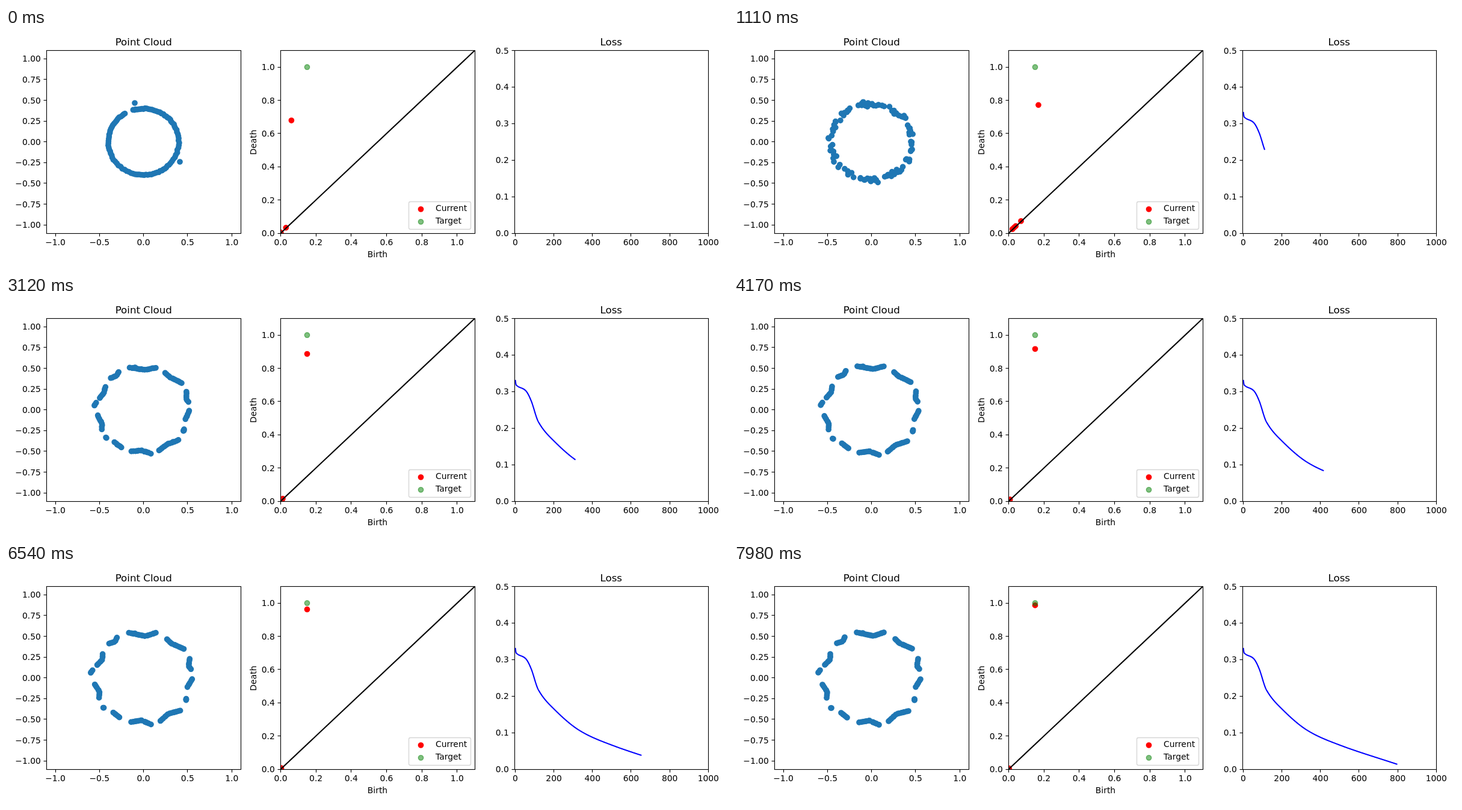
These frames come from a looping animation (1200x400 px, 8000 ms). An HTML page:

```html
<!DOCTYPE html>
<html lang="en">
<head>
<meta charset="utf-8">
<title>Point cloud optimisation</title>
<style>
  html, body { margin: 0; width: 100%; height: 100%; overflow: hidden; background: #fff; }
  svg { display: block; width: 100%; height: 100%; }
  text { font-family: "DejaVu Sans", sans-serif; font-size: 13.89px; fill: #000; }
  .title { font-size: 16.67px; }
  .axis { fill: none; stroke: #000; stroke-width: 1.11; }
</style>
</head>
<body>
<svg id="stage" viewBox="0 0 1200 400"></svg>
<script>
const LOOP = 8000, STEP = 30;
const TOP = 37.5, BOTTOM = 342, FRAME_BOTTOM = 342.5;
const stage = document.getElementById('stage');

function add(parent, tag, attrs, text) {
  const el = document.createElementNS('http://www.w3.org/2000/svg', tag);
  for (const key in attrs) el.setAttribute(key, attrs[key]);
  if (text !== undefined) el.textContent = text;
  parent.appendChild(el);
  return el;
}

const mix = (a, b, f) => a + (b - a) * f;
const range = (n, from, by) => Array.from({ length: n }, (_, i) => from + i * by);

// Seeded value between -1 and 1
const noise = n => {
  const v = Math.sin(n * 12.9898 + 4.1) * 43758.5453;
  return 2 * (v - Math.floor(v)) - 1;
};

// Scales
const cloudX = v => 228.6 + v * 146.6;
const cloudY = v => 189.75 - v * 138.4;
const diagX = v => 456.5 + v * 293.2;
const diagY = v => BOTTOM - v * 276.8;
const lossX = v => 846.4 + v * 0.3209;
const lossY = v => BOTTOM - v * 609;

function panel(id, left, right) {
  const clip = add(stage, 'clipPath', { id });
  add(clip, 'rect', { x: left, y: TOP, width: right - left, height: BOTTOM - TOP });
  return add(stage, 'g', { 'clip-path': `url(#${id})` });
}

function axes(left, right, xs, ys, x, y, xDigits, yDigits) {
  const label = (v, digits) => v.toFixed(digits).replace('-', '\u2212');
  const snap = v => Math.floor(v) + 0.5;
  add(stage, 'rect', { class: 'axis', x: left, y: TOP, width: right - left, height: FRAME_BOTTOM - TOP });
  for (const v of xs) {
    add(stage, 'path', { class: 'axis', d: `M${snap(x(v))} ${FRAME_BOTTOM}v5` });
    add(stage, 'text', { x: x(v), y: 362, 'text-anchor': 'middle' }, label(v, xDigits));
  }
  for (const v of ys) {
    add(stage, 'path', { class: 'axis', d: `M${left} ${snap(y(v))}h-5` });
    add(stage, 'text', { x: left - 9.7, y: Math.round(y(v) + 5), 'text-anchor': 'end' }, label(v, yDigits));
  }
}

function dot(parent, color, x, y, opacity = 1) {
  return add(parent, 'circle', {
    r: 4.17, cx: x, cy: y, fill: color, stroke: color, 'stroke-width': 1.39,
    'fill-opacity': opacity, 'stroke-opacity': opacity
  });
}

function move(el, x, y) {
  el.setAttribute('cx', x.toFixed(2));
  el.setAttribute('cy', y.toFixed(2));
}

// Panels
const cloud = panel('cloud', 67.5, 390.5);
const diagram = panel('diagram', 456.5, 779.5);
const chart = panel('chart', 845.5, 1167.5);

const noisy = range(4, 0, 1).map(() => dot(diagram, '#f00', 0, 0));
const current = dot(diagram, '#f00', 0, 0);
dot(diagram, '#008000', diagX(0.15), diagY(1), 0.5);
add(diagram, 'path', {
  d: `M${diagX(0)} ${diagY(0)}L${diagX(1.1)} ${diagY(1.1)}`, stroke: '#000', 'stroke-width': 2.08
});
const curve = add(chart, 'path', {
  fill: 'none', stroke: '#00f', 'stroke-width': 2.08, 'stroke-linejoin': 'round'
});

axes(67.5, 390.5, range(5, -1, 0.5), range(9, -1, 0.25), cloudX, cloudY, 1, 2);
axes(456.5, 779.5, range(6, 0, 0.2), range(6, 0, 0.2), diagX, diagY, 1, 1);
axes(845.5, 1167.5, range(6, 0, 200), range(6, 0, 0.1), lossX, lossY, 0, 1);
add(stage, 'text', { class: 'title', x: 228.8, y: 29, 'text-anchor': 'middle' }, 'Point Cloud');
add(stage, 'text', { class: 'title', x: 1005.8, y: 29, 'text-anchor': 'middle' }, 'Loss');
add(stage, 'text', { x: 617.5, y: 382, 'text-anchor': 'middle' }, 'Birth');
add(stage, 'text', { transform: 'translate(416 190.5) rotate(-90)', 'text-anchor': 'middle' }, 'Death');

// Legend
add(stage, 'rect', {
  x: 669.5, y: 289.5, width: 103, height: 46, rx: 2.8,
  fill: '#fff', 'fill-opacity': 0.8, stroke: '#ccc', 'stroke-opacity': 0.8, 'stroke-width': 1.39
});
dot(stage, '#f00', 689.5, 302);
dot(stage, '#008000', 689.5, 323, 0.5);
add(stage, 'text', { x: 714, y: 305 }, 'Current');
add(stage, 'text', { x: 714, y: 326 }, 'Target');

// Each cluster settles along a short bent line; clockwise from the top.
const clusters = [
  'M204 114L232 120L249 114', 'M268 125L275 132L296 141', 'M306 158L304 170L308 175',
  'M310 192L302 205', 'M300 225v2', 'M290 245L270 250L257 262', 'M241 268L225 261L208 264',
  'M188 256L178 248', 'M162 240h-1', 'M154 223L155 213L147 201', 'M140 181L143 177',
  'M151 168L160 159V150', 'M171 132L181 129L184 122'
];
const DOT_GAP = 3.4;

function polar({ x, y }) {
  const u = (x - 228.6) / 146.6, v = (189.75 - y) / 138.4;
  const a = Math.atan2(u, v);
  return { a: a < -0.4 ? a + 2 * Math.PI : a, r: Math.hypot(u, v) };
}

function settle(d) {
  const path = add(stage, 'path', { d, fill: 'none' });
  const length = path.getTotalLength(), last = Math.round(length / DOT_GAP) + 1;
  const ends = range(last + 1, 0, 1).map(i => {
    const shift = i % last ? 0.4 * noise(i + length) : 0;
    return polar(path.getPointAtLength(length * (i + shift) / last));
  });
  path.remove();
  return ends;
}

// Smooth the angles into an even ring, keeping both open ends.
function evenAngles(angles) {
  for (let n = 0; n < 30; n++)
    angles = angles.map((a, i) =>
      i && i < angles.length - 1 ? (angles[i - 1] + 2 * a + angles[i + 1]) / 4 : a);
  return angles;
}

function buildCloud() {
  const ends = clusters.flatMap(settle);
  const angles = evenAngles(ends.map(e => e.a));
  const ring = ends.map((end, i) => ({
    from: { a: angles[i], r: 0.4 + 0.005 * noise(i + 500) },
    end, jr: 0.026 * noise(i), ja: 0.045 * noise(i + 200), lag: 1
  }));
  const stray = (x, y, toX, toY) => ({
    from: polar({ x, y }), end: polar({ x: toX, y: toY }), jr: 0, ja: 0, lag: 2
  });
  const all = [...ring, stray(214, 125, 214, 115), stray(289, 223, 300, 226)];
  for (const p of all) p.el = dot(cloud, '#1f77b4', 0, 0);
  return all;
}
const points = buildCloud();

// Loss key points: step, value
const lossKeys = [[0, 0.332], [5, 0.318], [55, 0.302], [83, 0.274], [120, 0.217],
  [200, 0.165], [330, 0.107], [500, 0.066], [800, 0.013]];

function slope(i) {
  const a = lossKeys[Math.max(0, i - 1)], b = lossKeys[Math.min(lossKeys.length - 1, i + 1)];
  return (b[1] - a[1]) / (b[0] - a[0]);
}

// Smooth curve through the key points
function loss(step) {
  let i = 0;
  while (i < lossKeys.length - 2 && step > lossKeys[i + 1][0]) i++;
  const [x0, y0] = lossKeys[i], [x1, y1] = lossKeys[i + 1];
  const w = x1 - x0, f = (step - x0) / w, g = 1 - f;
  return y0 * g * g * (1 + 2 * f) + y1 * f * f * (1 + 2 * g)
    + w * f * g * (slope(i) * g - slope(i + 1) * f);
}

const rise = t => 1 - Math.exp(-t / 2300);
const growth = t => rise(t) / rise(LOOP);
// Restlessness: peaks at 900 ms, then dies down
const shake = t => (t / 900 * Math.exp(1 - t / 900)) ** 2;

function draw(t) {
  const k = growth(t), s = shake(t);
  for (const p of points) {
    const r = mix(p.from.r, p.end.r, k ** p.lag) + p.jr * s;
    const a = mix(p.from.a, p.end.a, k ** 0.6) + p.ja * s;
    move(p.el, cloudX(r * Math.sin(a)), cloudY(r * Math.cos(a)));
  }

  noisy.forEach((el, i) => {
    const lasting = i ? 0 : 0.03 * Math.exp(-t / 3000);
    const b = lasting + (0.053 - 0.01 * i) * s ** 1.5;
    move(el, diagX(b), diagY(b + 0.003));
    el.setAttribute('visibility', i && t > 3500 ? 'hidden' : 'inherit');
  });
  const birth = 0.15 + 0.023 * s * s - 0.089 * Math.exp(-t / 300);
  const step = t / 10;
  move(current, diagX(birth), diagY(Math.max(0.679, 1 - loss(step))));

  const steps = step ? range(Math.floor(step) + 1, 0, 1) : [];
  const line = steps.map(n => `${lossX(n).toFixed(2)} ${lossY(loss(n)).toFixed(2)}`);
  curve.setAttribute('d', line.length ? 'M' + line.join('L') : '');
}

const start = performance.now();
function tick() {
  const t = Math.max(0, performance.now() - start) % LOOP;
  draw(Math.floor(t / STEP) * STEP);
  requestAnimationFrame(tick);
}
tick();
</script>
</body>
</html>
```
